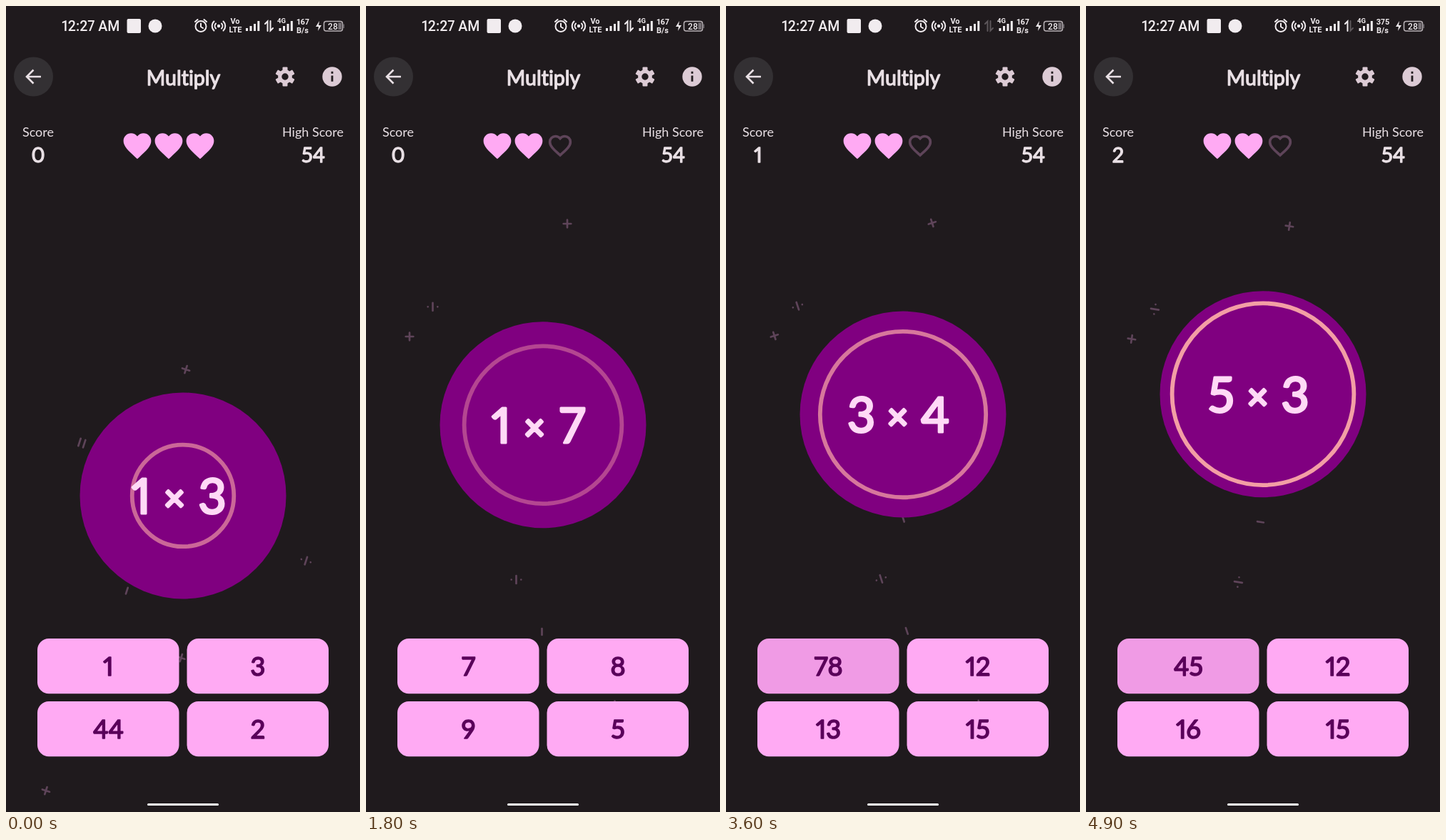
Recreate the animation shown at these times as an HTML page. Size 496 px wide and 1129 px high, loop 5 s.

```html
<!DOCTYPE html>
<html lang="en">
<head>
<meta charset="utf-8">
<title>Multiply</title>
<style>
  html, body { margin: 0; width: 100%; height: 100%; overflow: hidden; background: #1f1a1d; }
  svg { display: block; width: 496px; height: 1129px; }
  text { font-family: Lato, sans-serif; font-variant-ligatures: none; font-variant-numeric: proportional-nums; fill: #e9e0e5; }
  .round { stroke: #e9e0e5; stroke-width: .045em; stroke-linejoin: round; }
  .mid { text-anchor: middle; }
  .status, .status text { font-family: Roboto, sans-serif; fill: #f1ecef; }
  .line { fill: none; stroke: #f1ecef; stroke-width: 2; stroke-linecap: round; }
  .symbols path { fill: none; stroke: #5e4459; stroke-width: 2.7; stroke-linecap: round; }
  .question text { fill: #ffd9f6; stroke: #ffd9f6; font-size: 68px; }
  .question .times { font-size: 50px; stroke-width: .08em; }
  .answer text { fill: #5a005a; stroke: #5a005a; font-size: 36px; }
  .icon { fill: #dccbd5; }
</style>
</head>
<body>
<svg viewBox="0 0 496 1129" xmlns="http://www.w3.org/2000/svg">
  <defs>
    <path id="heart" d="M12 21.35l-1.45-1.32C5.4 15.36 2 12.28 2 8.5 2 5.42 4.42 3 7.5 3c1.74 0 3.41.81 4.5 2.09C13.09 3.81 14.76 3 16.5 3 19.58 3 22 5.42 22 8.5c0 3.78-3.4 6.86-8.55 11.54z"/>
    <path id="bars" d="M0 31h3v4h-3zM5.5 28h3v7h-3zM11 25h3v10h-3zM16.3 21h3v14h-3z"/>
  </defs>
  <rect width="496" height="1129" fill="#1f1a1d"/>

  <g class="status">
    <text x="78" y="35" font-size="19.5" font-weight="500">12:27 AM</text>
    <rect x="169.5" y="18" width="19.5" height="20" rx="2"/>
    <circle cx="209" cy="28" r="9.5"/>
    <g class="line">
      <circle cx="273" cy="28.5" r="7.5"/>
      <path d="M273 24.5v4.5l3 2M265 22l3.5-3M281 22l-3.5-3"/>
      <path d="M294 24.5a5 5 0 0 0 0 7M302 24.5a5 5 0 0 1 0 7M291.5 21.5a9 9 0 0 0 0 13M304.5 21.5a9 9 0 0 1 0 13"/>
    </g>
    <circle cx="298" cy="28" r="2.2"/>
    <g class="mid" font-weight="700">
      <text x="321" y="25" font-size="11">Vo</text>
      <text x="321.5" y="37" font-size="11">LTE</text>
      <text x="386" y="24" font-size="9.5">4G</text>
      <text id="rate" x="416" y="25.5" font-size="11"></text>
      <text x="415.5" y="38" font-size="11">B/s</text>
    </g>
    <use href="#bars" x="336"/>
    <use href="#bars" x="382.5"/>
    <path id="up" class="line" d="M363 25l3.5-3.5V35"/>
    <path id="down" class="line" d="M370.5 21v13.5l3.5-3.5"/>
    <path d="M439 21l-5 8h4l-1 6 5-8h-4z"/>
    <rect x="445.5" y="21.5" width="26" height="13.5" rx="3" fill="none" stroke="#b9b3b7" stroke-width="1.5"/>
    <path d="M465.5 23.5h4.5v9.5h-4.5zM472.5 25.5h1.5v5.5h-1.5z" fill="#777176"/>
    <text x="458" y="32.5" class="mid" font-size="12" font-weight="500">28</text>
  </g>

  <circle cx="38.5" cy="99" r="27.5" fill="#333033"/>
  <path d="M49 99H29.5M38.5 89.5L29 99l9.5 9.5" fill="none" stroke="#e9e0e5" stroke-width="2.6"/>
  <text class="round mid" x="248.5" y="111" font-size="28.5">Multiply</text>
  <g id="gear" class="icon" transform="translate(391 99)">
    <circle r="7.3" fill="none" stroke="#dccbd5" stroke-width="5.2"/>
  </g>
  <circle class="icon" cx="457" cy="99" r="13.7"/>
  <path d="M455.6 91.8h2.8v2.9h-2.8zM455.6 97.4h2.8v8.4h-2.8z" fill="#1f1a1d"/>

  <text class="mid" x="45" y="183" font-size="18">Score</text>
  <text class="mid" x="430" y="183" font-size="18">High Score</text>
  <text id="score" class="round mid" x="45" y="218.5" font-size="29"></text>
  <text class="round mid" x="430.5" y="218.5" font-size="29">54</text>
  <g fill="#ffaaf3">
    <use href="#heart" transform="translate(160.7 172.4) scale(1.94 1.96)"/>
    <use href="#heart" transform="translate(204.7 172.4) scale(1.94 1.96)"/>
    <use id="life" href="#heart" transform="translate(248.7 172.4) scale(1.94 1.96)"/>
  </g>
  <use id="lost" href="#heart" transform="translate(272 195.8) scale(1.44) translate(-12 -12.2)" fill="none" stroke="#5e4459" stroke-width="2.5"/>

  <g id="symbols" class="symbols"></g>
  <g id="ball" class="question">
    <circle r="144.5" fill="#800080"/>
    <circle id="ring" fill="none" stroke="#f6a2a6" stroke-width="5.8"/>
    <text id="left" class="round mid" x="-58.5" y="25"></text>
    <text id="times" class="round mid times" y="21">×</text>
    <text id="right" class="round mid" y="25"></text>
  </g>
  <g id="answers" class="answer"></g>
  <rect x="198" y="1117" width="100" height="3" rx="1.5" fill="#fff"/>
</svg>
<script>
const LOOP = 5000, STEP = 100, SPEED = 0.0545, TOP = 495.5;
const $ = id => document.getElementById(id);

function add(parent, tag, attrs) {
  const el = document.createElementNS('http://www.w3.org/2000/svg', tag);
  for (const key in attrs) el.setAttribute(key, attrs[key]);
  return parent.appendChild(el);
}

for (let i = 0; i < 6; i++) {
  add($('gear'), 'rect', { x: -3.5, y: -13.6, width: 7, height: 6, rx: 1, transform: `rotate(${i * 60})` });
}

// Each round: start time, operands, answers, score
const rounds = [
  [-3494, '1', '3', [1, 3, 44, 2], 0],
  [125, '1', '7', [7, 8, 9, 5], 0],
  [2195, '3', '4', [78, 12, 13, 15], 1],
  [4015, '5', '3', [45, 12, 16, 15], 2]
];

// Spans during which a button looks pressed: index, from, to
const presses = [[0, 300, 1400], [0, 3500, 4000], [1, 4000, 4600], [0, 4600, LOOP]];

// Data arrows: time, up lit, down lit
const traffic = [[0, 1, 1], [300, 0, 0], [1200, 1, 1], [2200, 1, 0], [3300, 0, 0], [4300, 1, 0]];

const shapes = {
  '+': 'M-5.3 0H5.3M0-5.3V5.3',
  '-': 'M-4.5 0H4.5',
  '=': 'M-5.5-3.5H5.5M-5.5 3.5H5.5',
  '/': 'M-5.5 0H5.5M0-6.8v.01M0 6.8v.01'
};

// Floating signs: shape, pivot, visible from, to
const SWAP = 1500;
const symbols = [
  ['+', 248.7, 508, 0, SWAP], ['=', 103, 611, 0, SWAP], ['/', 417, 776, 0, SWAP],
  ['-', 166, 818, 0, SWAP], ['+', 242, 912, 0, SWAP], ['+', 52.6, 1098, 0, SWAP],
  ['+', 285.5, 305, SWAP, LOOP], ['/', 97, 421.3, SWAP, LOOP], ['+', 64.5, 463, SWAP, LOOP],
  ['-', 245, 719.3, SWAP, LOOP], ['/', 214, 803.5, SWAP, LOOP],
  ['-', 250, 876.5, SWAP, 4700], ['+', 352, 979, SWAP, LOOP]
].map(([kind, x, y, from, to]) => ({ x, y, from, to, el: add($('symbols'), 'path', { d: shapes[kind] }) }));

const buttons = [[44, 886], [253.5, 886], [44, 974], [253.5, 974]].map(([x, y]) => {
  const face = add($('answers'), 'rect', { x, y, width: 198.5, height: 77.2, rx: 16 });
  const label = add($('answers'), 'text', { x: x + 99.5, y: y + 52, class: 'round mid' });
  return { face, label };
});

const current = (list, t) => list.filter(item => item[0] <= t).pop();
const show = (el, on) => el.setAttribute('visibility', on ? 'visible' : 'hidden');

function draw(t) {
  const [start, a, b, answers, score] = current(rounds, t);
  const age = t - start;

  $('ball').setAttribute('transform', `translate(248 ${TOP + SPEED * age})`);
  $('ring').setAttribute('r', 146.4 - 0.0215 * age);
  $('ring').setAttribute('opacity', 0.63 - 0.37 * Math.cos(Math.PI * age / 1000));
  const narrow = a === '1';
  $('left').textContent = a;
  $('right').textContent = b;
  $('times').setAttribute('x', narrow ? -12 : -7.5);
  $('right').setAttribute('x', narrow ? 41 : 45);
  $('score').textContent = score;

  buttons.forEach(({ face, label }, i) => {
    const down = presses.some(([n, from, to]) => n === i && t >= from && t < to);
    face.setAttribute('fill', down ? '#f09be5' : '#ffaaf3');
    label.textContent = answers[i];
  });

  const intact = t < rounds[1][0];
  show($('life'), intact);
  show($('lost'), !intact);

  const [, up, down] = current(traffic, t);
  $('up').style.stroke = up ? '#f1ecef' : '#5c565a';
  $('down').style.stroke = down ? '#f1ecef' : '#5c565a';
  $('rate').textContent = t < 4300 ? '167' : '375';

  const angle = 0.09 * t - 72;
  for (const { x, y, from, to, el } of symbols) {
    show(el, t >= from && t < to);
    el.setAttribute('transform', `translate(${x} ${y}) rotate(${angle}) translate(0 3.5)`);
  }
}

const origin = performance.now();
function tick() {
  const t = (performance.now() - origin) % LOOP;
  draw(Math.floor(t / STEP) * STEP);
  requestAnimationFrame(tick);
}
tick();
</script>
</body>
</html>
```
